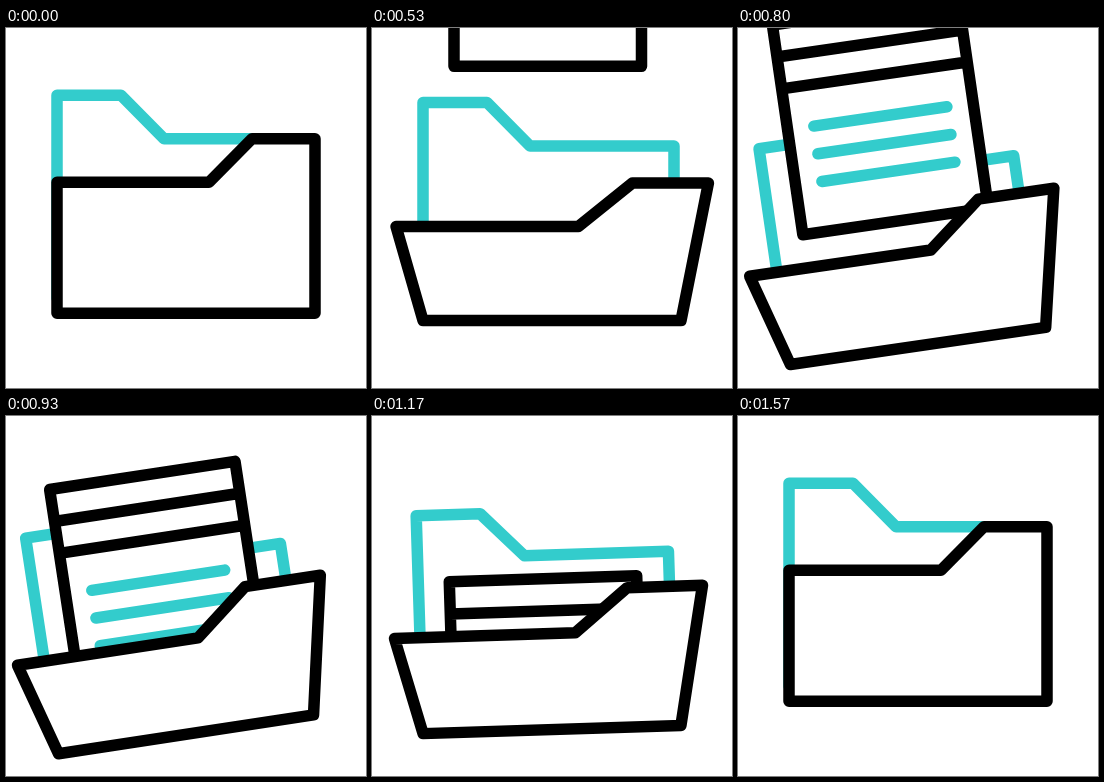
Animation, 360 px wide and 360 px high, one loop 2000 ms. Source, as an HTML page:

```html
<!DOCTYPE html>
<html lang="en">
<head>
<meta charset="utf-8">
<title>Folder</title>
<style>
  html, body { margin: 0; width: 100%; height: 100%; overflow: hidden; background: #fff; }
  svg { display: block; width: 100%; height: 100%; }
  path { fill: #fff; stroke: #000; stroke-width: 11.5; stroke-linecap: round; stroke-linejoin: round; }
  .teal { stroke: #3cc; }
</style>
</head>
<body>
<svg viewBox="0 0 360 360">
  <defs>
    <clipPath id="pocket"><rect x="-360" y="-720" width="720" height="712"/></clipPath>
  </defs>
  <!-- The rig's origin is the middle of the folder's bottom edge. -->
  <g id="rig">
    <path class="teal" d="M-129-15V-218H-65L-22-174.500H122V-15"/>
    <g clip-path="url(#pocket)">
      <g id="sheet">
        <path d="M-98 0H89.500V212H-98ZM-98 32.300H89.500M-98 64.600H89.500"/>
        <path class="teal" d="M-71.500 106H63M-71.500 134H63M-71.500 162H63"/>
      </g>
    </g>
    <path id="front"/>
  </g>
</svg>
<script>
const LOOP = 2000, STEP = 1000 / 30;
const [rig, sheet, front] = ['rig', 'sheet', 'front'].map(id => document.getElementById(id));

const sine = p => (1 - Math.cos(Math.PI * p)) / 2;
const quad = p => p * p;
const linear = p => p;

// Rows are [time, value, easing towards this value].
const TRACKS = {
  open: [[0, 0], [610, 1], [1000, .97], [1370, .68, quad], [1566, 0, linear]],
  drop: [[400, 0], [830, 33], [1070, 33], [1460, 0]],
  tilt: [[535, 0], [900, -10], [1070, 4.7], [1205, -3.3], [1350, 0]],
  sheet: [[310, -506], [1402, -107]]
};

function valueAt(track, t) {
  if (t <= track[0][0]) return track[0][1];
  const i = track.findIndex(row => row[0] > t);
  if (i < 0) return track[track.length - 1][1];
  const [t0, a] = track[i - 1];
  const [t1, b, ease = sine] = track[i];
  return a + (b - a) * ease((t - t0) / (t1 - t0));
}

function frontPath(open) {
  const low = -131 + 38.5 * open, high = -174.5 + 38.5 * open;
  return `M-129 0L${-129 - 28 * open} ${low}L${23 + 3.5 * open} ${low}` +
    `L${66 + 15 * open} ${high}L${129 + 28.5 * open} ${high}L129 0Z`;
}

function draw(time) {
  const t = Math.floor((time % LOOP + 4) / STEP) * STEP % LOOP;
  const at = name => valueAt(TRACKS[name], t);
  rig.setAttribute('transform', `translate(180 ${285.3 + at('drop')}) rotate(${at('tilt')})`);
  sheet.setAttribute('transform', `translate(0 ${at('sheet')})`);
  front.setAttribute('d', frontPath(at('open')));
}

const start = performance.now();
function tick() {
  draw(performance.now() - start);
  requestAnimationFrame(tick);
}
tick();
</script>
</body>
</html>
```
